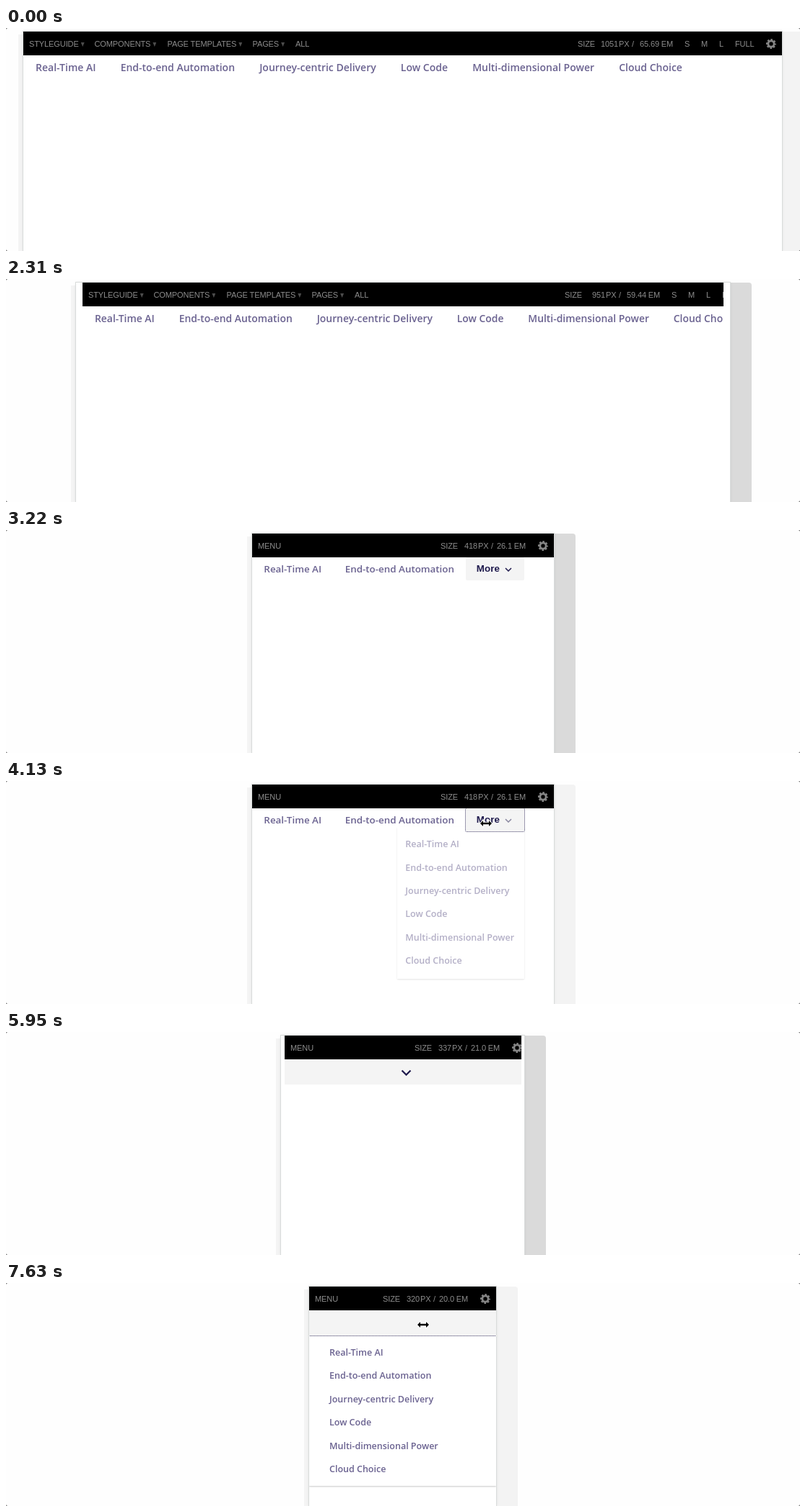
These frames come from a looping animation (1100 by 310 pixels, 8 s). An HTML page:

```html
<!DOCTYPE html>
<html lang="en">
<head>
<meta charset="utf-8">
<title>Responsive navigation</title>
<style>
  html, body { margin: 0; width: 100%; height: 100%; overflow: hidden; background: #666; }
  #stage { position: absolute; inset: 0; overflow: hidden; background: #fefefe; border-radius: 3px; }
  #stage * { box-sizing: border-box; }
  #panel, #edge, #handle, #view { position: absolute; top: 5px; bottom: 0; }
  #panel { background: #fff; box-shadow: 0 0 0 1px #d9dcdb, 0 0 4px rgba(0, 0, 0, .12); }
  #edge { top: 9px; width: 6px; background: #f4f4f4; }
  #handle { width: 30px; border-radius: 0 4px 0 0; }
  #view { overflow: hidden; background: #fff; white-space: nowrap; }

  #bar { position: relative; z-index: 2; height: 33px; background: #000; color: #8d8d8d; letter-spacing: -.1px;
         font: 11px/34px "Liberation Sans", Arial, sans-serif; }
  #bar span, #bar svg, #size { position: absolute; top: 0; }
  .drop::after { content: ""; display: inline-block; width: 5px; height: 6px; margin-left: 3px;
                 background: #4c4c4c; clip-path: polygon(0 0, 100% 0, 50% 100%); }
  #size { right: 39px; width: 132px; height: 33px; --shift: 0px; }
  .wide #size { right: 151px; }
  .narrow #size { width: 118px; --shift: 9px; }
  #px { right: calc(76px - var(--shift)); }
  #unit { right: calc(60.5px - var(--shift)); }
  #slash { right: calc(54px - var(--shift)); }
  #em { right: 19px; }
  #bar:not(.wide) .preset, #bar.narrow .page, #bar:not(.narrow) .menu { display: none; }
  #gear { right: 7px; margin-top: 9px; }

  #nav { position: relative; display: flex; line-height: 2.4; color: #6a6290;
         font-family: "Open Sans", sans-serif; font-weight: 600; }
  .link { flex: none; padding: 0 1.22em; }
  #more { position: relative; z-index: 0; flex: none; }
  #button { position: relative; padding: 0 34.5px 0 14.5px; background: #f4f4f4; color: #1f1a4d;
            border-radius: 2px; font-family: "Liberation Sans", Arial, sans-serif; font-weight: 700; }
  #button.focus { outline: 1px dotted #3a3560; }
  #chevron { position: absolute; right: 17.5px; top: calc(50% - 2.5px); width: 10px; height: 6px; }
  #menu { position: absolute; z-index: -1; top: calc(100% + 1px); right: 0; width: 176px; padding: 8px 11px;
          background: #fff; box-shadow: 0 1px 2px rgba(0, 0, 0, .22); font-size: 12.5px; line-height: 32.4px; }
  .mobile #more { width: 100%; }
  .mobile #button { height: 35px; border-radius: 0; }
  .mobile #button span { display: none; }
  .mobile #chevron { left: calc(50% - 7.5px); top: 13.5px; width: 15px; height: 9px; }
  .mobile #menu { width: 100%; padding: 7px 28px; }
  #cursor { position: absolute; left: -10px; top: -6px; }
</style>
</head>
<body>
<div id="stage">
  <div id="edge"></div>
  <div id="handle"></div>
  <div id="panel"></div>
  <div id="view">
    <div id="bar">
      <span class="menu" style="left:8px">MENU</span>
      <span class="page drop" style="left:8px">STYLEGUIDE</span>
      <span class="page drop" style="left:98.5px">COMPONENTS</span>
      <span class="page drop" style="left:199.5px">PAGE TEMPLATES</span>
      <span class="page drop" style="left:317.5px">PAGES</span>
      <span class="page" style="left:377px">ALL</span>
      <div id="size">
        <span style="left:0">SIZE</span><span id="px"></span><span id="unit">PX</span>
        <span id="slash">/</span><span id="em"></span><span style="right:0">EM</span>
      </div>
      <span class="preset" style="left:calc(100% - 135px)">S</span>
      <span class="preset" style="left:calc(100% - 112px)">M</span>
      <span class="preset" style="left:calc(100% - 87px)">L</span>
      <span class="preset" style="left:calc(100% - 65px)">FULL</span>
      <svg id="gear" width="16" height="16" viewBox="-8 -8 16 16" fill="none" stroke="#858585">
        <circle r="4.1" stroke-width="2.8"/>
        <circle r="6" stroke-width="2" stroke-dasharray="2.6 2.112" stroke-dashoffset="1.3"/>
      </svg>
    </div>
    <div id="nav">
      <div id="more">
        <div id="button"><span>More</span>
          <svg id="chevron" viewBox="0 0 10 6" fill="none" stroke="#1f1a4d" stroke-width="1.5">
            <path d="M1 1l4 4 4-4"/>
          </svg>
        </div>
        <div id="menu"></div>
      </div>
    </div>
  </div>
  <svg id="cursor" width="20" height="12" viewBox="-10 -6 20 12">
    <path d="M-8 0L-4-4V-1.3H4V-4L8 0 4 4V1.3H-4V4Z" stroke="#fff" paint-order="stroke" stroke-width="2"/>
  </svg>
</div>
<script>
const LOOP = 8000, STEP = 70, CENTER = 550;
const $ = id => document.getElementById(id);
const [edge, handle, panel, view, bar, nav, more, button, chevron, menu, cursor] =
  ["edge", "handle", "panel", "view", "bar", "nav", "more", "button", "chevron", "menu", "cursor"].map($);

const labels = ["Real-Time AI", "End-to-end Automation", "Journey-centric Delivery",
                "Low Code", "Multi-dimensional Power", "Cloud Choice"];
const makeLabel = (text, className) =>
  Object.assign(document.createElement("div"), { textContent: text, className });
const links = labels.map(text => makeLabel(text, "link"));
more.before(...links);
menu.append(...labels.map(text => makeLabel(text, "")));

// Keyed tracks: [time, value]
const widthKeys = [[1890, 1051], [1960, 1048], [2030, 1041], [2170, 995], [2380, 862], [2590, 685], [2660, 643],
                   [2730, 597], [2800, 548], [2940, 474], [3080, 430], [3150, 418],
                   [5740, 418], [5810, 392], [5880, 337], [5950, 337], [6020, 314], [6090, 280], [6160, 259]];
const cursorX = [[3430, 776], [3920, 665], [5040, 665], [5320, 768], [5600, 776], [6510, 696], [7140, 578]];
const cursorY = [[3430, 110], [3920, 59], [5040, 59], [5320, 90], [6510, 110], [7140, 58]];

const ramp = (t, from, to) => Math.min(1, Math.max(0, (t - from) / (to - from)));
const within = (t, from, to) => t >= from && t < to;

function track(keys, t) {
  let value = keys[0][1];
  for (let i = 1; i < keys.length; i++) {
    value += (keys[i][1] - keys[i - 1][1]) * ramp(t, keys[i - 1][0], keys[i][0]);
  }
  return value;
}

const widthAt = t => Math.round(track(widthKeys, t));

function place(element, width) {
  const left = Math.floor(CENTER - width / 2);
  element.style.left = left + "px";
  element.style.width = width + "px";
  return left;
}

function layoutBar(width) {
  const narrow = width < 570, size = Math.max(320, width), em = (size / 16).toFixed(2);
  bar.style.width = width + "px";
  bar.className = narrow ? "narrow" : width >= 700 ? "wide" : "";
  $("px").textContent = size;
  $("em").textContent = narrow ? em.slice(0, 4) : em;
}

// Keep the links that fit beside the More button; fewer than two collapses to the mobile bar.
function layoutNav(width) {
  nav.className = "";
  nav.style.width = width + "px";
  nav.style.fontSize = 13 + width / 1051 + "px";
  for (const element of [...links, more]) element.style.display = "";
  const widths = links.map(link => link.offsetWidth);
  const total = widths.reduce((a, b) => a + b);
  if (total <= width) {
    more.style.display = "none";
    return;
  }
  let used = more.offsetWidth, count = 0;
  while (used + widths[count] <= width) used += widths[count++];
  if (count < 2) count = 0;
  nav.className = count ? "" : "mobile";
  links.forEach((link, i) => { if (i >= count) link.style.display = "none"; });
}

function render(t) {
  const width = widthAt(t), next = widthAt(t + STEP), layoutWidth = widthAt(t - STEP);
  const left = place(panel, width);
  place(view, Math.round(width + 0.4 * (next - width)));
  edge.style.left = left - 7 + "px";
  handle.style.left = left + width + "px";
  const active = within(t, 1540, 3640) || within(t, 5460, 6720);
  handle.style.background = active ? "#dadada" : "#f3f3f3";

  layoutBar(layoutWidth);
  layoutNav(layoutWidth);

  const open = ramp(t, 3990, 4270) - ramp(t, 4690, 4970) + ramp(t, 7350, 7630);
  menu.style.visibility = open > 0 ? "visible" : "hidden";
  menu.style.opacity = open;
  menu.style.transform = `translateY(${-14 * (1 - open)}px)`;
  chevron.style.opacity = 1 - ramp(t, 3990, 4270) + ramp(t, 4690, 5180) - ramp(t, 7350, 7630);
  button.className = within(t, 3990, 5600) || t >= 7350 ? "focus" : "";

  cursor.style.visibility = within(t, 3500, 5600) || t >= 6580 ? "visible" : "hidden";
  cursor.style.transform = `translate(${track(cursorX, t)}px, ${track(cursorY, t)}px)`;
}

const start = performance.now();
let shown = -1;
function tick() {
  const time = (performance.now() - start) % LOOP;
  const step = Math.floor(time / STEP) * STEP;
  if (step !== shown) render(shown = step);
  requestAnimationFrame(tick);
}
tick();
</script>
</body>
</html>
```
